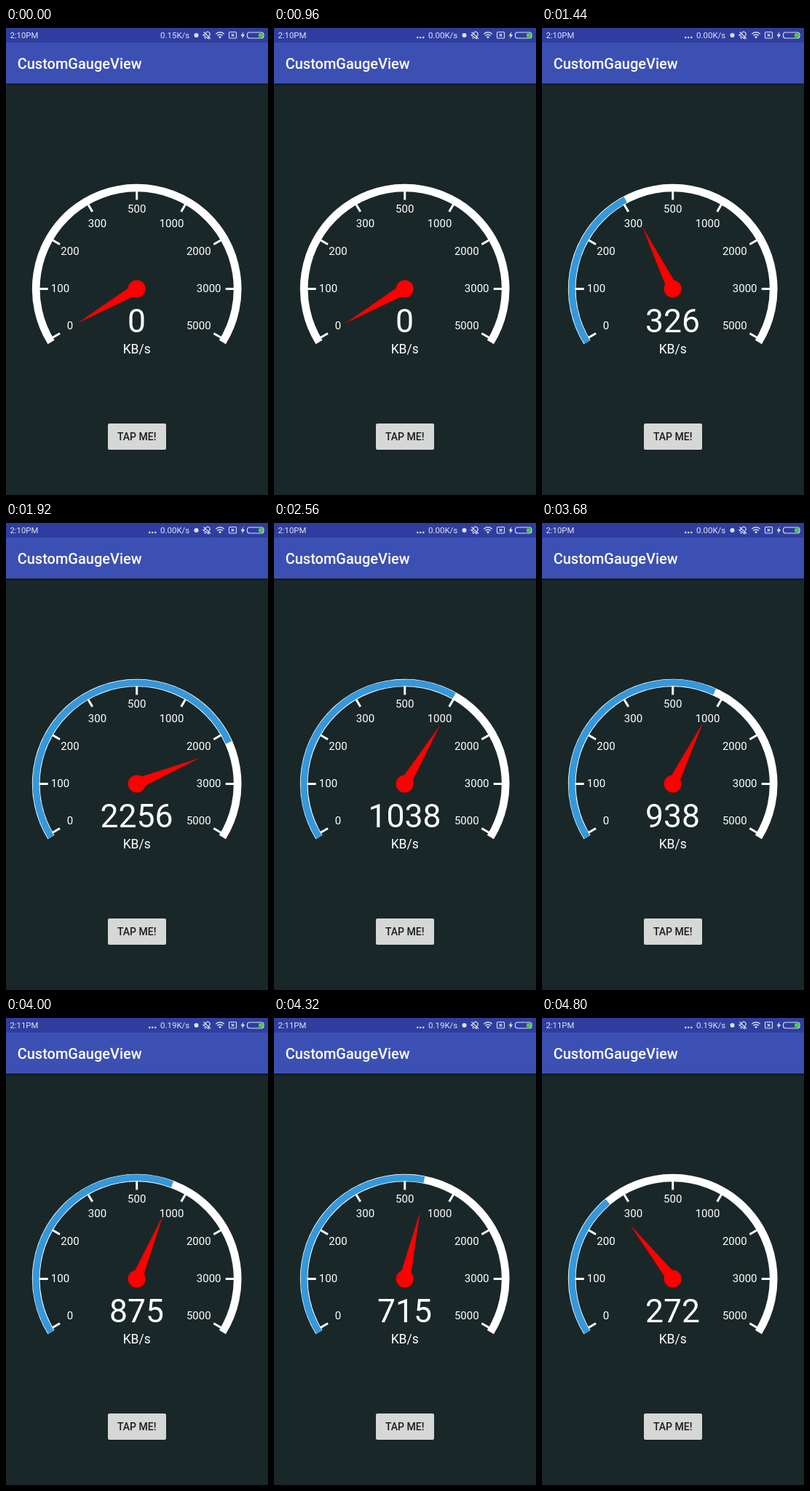
Recreate the animation shown at these times as an HTML page. Size 360 by 640 pixels, loop 4.96 s.

```html
<!DOCTYPE html>
<html lang="en">
<head>
<meta charset="utf-8">
<title>CustomGaugeView</title>
<style>
html, body { margin: 0; width: 100%; height: 100%; overflow: hidden; background: #1a2728; }
svg { display: block; width: 360px; height: 640px; font-family: Roboto, sans-serif; }
.mid { text-anchor: middle; }
</style>
</head>
<body>
<svg viewBox="0 0 360 640">
  <defs>
    <linearGradient id="shade" x1="0" y1="0" x2="0" y2="1">
      <stop offset="0" stop-color="#000" stop-opacity=".35"/>
      <stop offset="1" stop-color="#000" stop-opacity="0"/>
    </linearGradient>
  </defs>
  <rect width="360" height="640" fill="#1a2728"/>
  <rect y="76" width="360" height="4" fill="url(#shade)"/>
  <rect width="360" height="76" fill="#3c50b4"/>
  <rect width="360" height="20" fill="#2f3e9e"/>

  <g fill="#dfe2f1" font-size="11.5">
    <text id="clock" x="5.5" y="14" font-size="11.3">2:10PM</text>
    <text id="speed" x="252.3" y="14" text-anchor="end">0.15K/s</text>
    <g id="dots">
      <circle cx="197.3" cy="13" r="1.2"/><circle cx="201.3" cy="13" r="1.2"/><circle cx="205.3" cy="13" r="1.2"/>
    </g>
    <circle cx="261.5" cy="10" r="3"/>
  </g>
  <g fill="none" stroke="#dfe2f1" stroke-width="1.1">
    <g transform="rotate(35 276 10)">
      <path d="M271.5 12.500h9l-1.500-2V8a3 3 0 0 0-6 0v2.500zM274.500 14.500h3"/>
    </g>
    <path d="M271.500 5.500l9.500 9"/>
    <path d="M288.300 8.200a8 8 0 0 1 11.400 0M290.300 10.500a5.200 5.200 0 0 1 7.400 0" stroke-width="1.400"/>
    <path d="M292 12.200a2.800 2.800 0 0 1 4 0l-2 2.200z" fill="#dfe2f1" stroke="none"/>
    <rect x="306.500" y="5.500" width="10" height="8.500" rx="1"/>
    <path d="M309.700 8l3.600 3.600m0-3.600l-3.600 3.600"/>
    <path d="M326.500 5l-4 5.700h2.500l-1 4.300 4.200-6h-2.500z" fill="#dfe2f1" stroke="none"/>
    <rect x="331.500" y="6" width="22.500" height="8" rx="3"/>
    <rect x="347" y="7.200" width="6" height="5.600" rx="1.500" fill="#4cd137" stroke="none"/>
  </g>
  <text x="15.700" y="55.500" font-size="20" font-weight="500" fill="#fff">CustomGaugeView</text>

  <g fill="none">
    <path id="track" stroke="#fff" stroke-width="10.700"/>
    <path id="fill" stroke="#3498db" stroke-width="9"/>
  </g>
  <g id="ticks" stroke="#fff" stroke-width="3"></g>
  <g id="labels" class="mid" fill="#fff" font-size="15"></g>
  <g fill="#f00">
    <path id="needle" d="M-7.500 0L0-94L7.500 0z"/>
    <circle cx="179.700" cy="357.500" r="12"/>
  </g>
  <text id="value" class="mid" x="179.500" y="417.300" font-size="44.500" fill="#fff">0</text>
  <text class="mid" x="179.700" y="446" font-size="17.500" fill="#fff">KB/s</text>

  <rect x="140" y="543" width="80" height="35.500" rx="2" fill="#000" opacity=".3"/>
  <rect x="140" y="542" width="80" height="36" rx="2" fill="#d6d7d7"/>
  <text class="mid" x="179.800" y="565" font-size="14" font-weight="500" fill="#1c1c1c">TAP ME!</text>
</svg>
<script>
const LOOP = 4960, STEP = 160;
const CX = 179.7, CY = 357.5, RADIUS = 138.5, START = -121.8;
const scale = [0, 100, 200, 300, 500, 1000, 2000, 3000, 5000];
// time, KB/s, slope in scale steps per ms
const keys = [
  [960, 0, 0], [1920, 2256, 0], [3040, 624, 0],
  [3680, 938, 0], [4320, 715, -0.0012], [4800, 272, -0.0036]
];
const $ = id => document.getElementById(id);

// Point at a clockwise angle from straight up
function polar(r, deg) {
  const a = deg * Math.PI / 180;
  return [CX + r * Math.sin(a), CY - r * Math.cos(a)];
}

function arc(from, sweep) {
  if (sweep <= 0) return "";
  const a = polar(RADIUS, from), b = polar(RADIUS, from + sweep);
  return `M${a}A${RADIUS} ${RADIUS} 0 ${sweep > 180 ? 1 : 0} 1 ${b}`;
}

function toPos(v) {
  let i = 0;
  while (i < scale.length - 2 && v >= scale[i + 1]) i++;
  return i + (v - scale[i]) / (scale[i + 1] - scale[i]);
}

function toValue(p) {
  const i = Math.min(Math.floor(p), scale.length - 2);
  return scale[i] + (p - i) * (scale[i + 1] - scale[i]);
}

function posAt(t) {
  if (t <= keys[0][0]) return 0;
  const i = keys.findIndex(k => t <= k[0]);
  const [t0, v0, s0] = keys[i - 1], [t1, v1, s1] = keys[i];
  const d = t1 - t0, u = (t - t0) / d, w = 1 - u;
  return (1 + 2 * u) * w * w * toPos(v0) + u * w * w * d * s0
    + u * u * (3 - 2 * u) * toPos(v1) - u * u * w * d * s1;
}

function build() {
  const labelXY = [[88, 408], [74.5, 357], [88, 306], [125.5, 268], [179.7, 247.7],
    [227.5, 268], [264.8, 306], [278.7, 357], [264.8, 408]];
  $("track").setAttribute("d", arc(START, -2 * START));
  $("ticks").innerHTML = scale.map((v, i) => {
    const deg = (i - 4) * 30;
    return `<path d="M${polar(134, deg)}L${polar(122, deg)}"/>`;
  }).join("");
  $("labels").innerHTML = scale.map((v, i) =>
    `<text x="${labelXY[i][0]}" y="${labelXY[i][1] + 5.3}">${v}</text>`).join("");
}

function draw(time) {
  const t = Math.floor(time % LOOP / STEP) * STEP;
  const pos = posAt(t);
  $("fill").setAttribute("d", arc(START, pos * 30));
  $("needle").setAttribute("transform", `translate(${CX} ${CY}) rotate(${(pos - 4) * 30})`);
  $("value").textContent = Math.round(toValue(pos));
  $("clock").textContent = t < 4000 ? "2:10PM" : "2:11PM";
  $("speed").textContent = t < 480 ? "0.15K/s" : t < 4000 ? "0.00K/s" : "0.19K/s";
  $("dots").setAttribute("visibility", t < 160 ? "hidden" : "visible");
}

build();
const begin = performance.now();
function tick() {
  draw(performance.now() - begin);
  requestAnimationFrame(tick);
}
tick();
</script>
</body>
</html>
```
